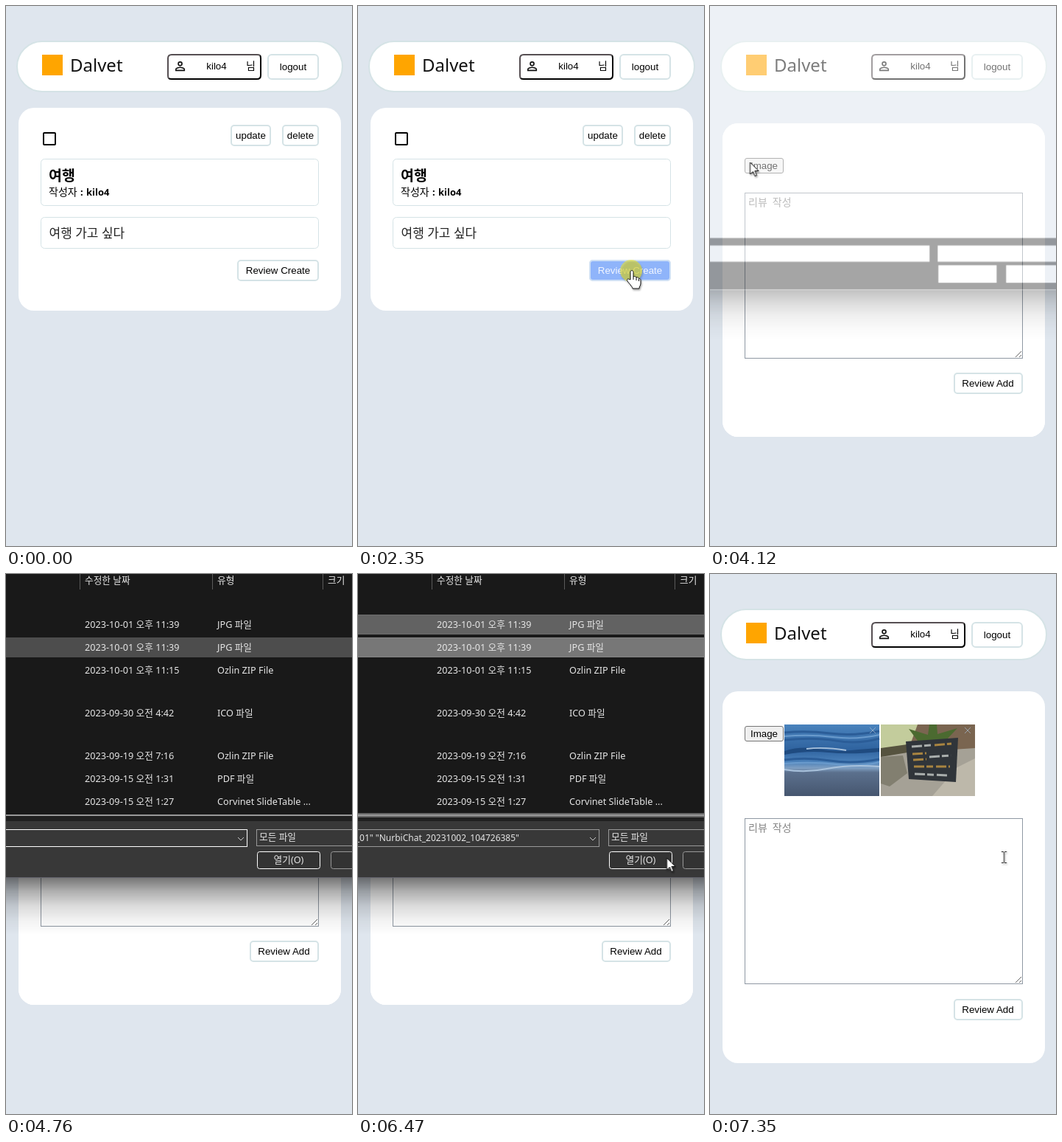
Animation of 470x732 px, one loop 8000 ms. Source, as an HTML page:

```html
<!DOCTYPE html>
<html lang="ko">
<head>
<meta charset="utf-8">
<title>Review with pictures</title>
<style>
html, body { margin: 0; width: 100%; height: 100%; overflow: hidden; background: #dfe6ee; }
svg { display: block; width: 470px; height: 732px; }
text { font: 13.33px 'Liberation Sans', Arial, sans-serif; }
.mid { text-anchor: middle; }
.ko { font-family: 'Noto Sans', 'Noto Sans CJK KR', 'Noto Sans CJK', sans-serif; }
.mono { font: 14px 'Noto Sans Mono CJK KR', 'Noto Sans CJK KR', 'Noto Sans CJK', monospace; fill: #858585; }
.brand { font: 24px 'Noto Sans', 'Open Sans', sans-serif; fill: #111; }
.btn rect { fill: #fff; stroke: #d5e3e6; stroke-width: 2; }
.box { fill: #fff; stroke: #d5e3e6; }
.dialog text { font: 12.7px 'Noto Sans', 'Noto Sans CJK KR', 'Noto Sans CJK', sans-serif; fill: #e6e6e6; }
.dialog .files { font-size: 12px; }
.row { fill: #191919; stroke: #191919; }

/* One percent of the loop is 80 ms. */
.step { animation: 8s step-end infinite; }
.flow { animation: 8s linear infinite; }
.off { opacity: 0; }

.list { animation-name: list; }
.form { animation-name: form; }
.hover { animation-name: hover; }
.photos { animation-name: photos; }
.drop { animation-name: drop; }
@keyframes list { 31% { opacity: 0; } }
@keyframes form { 31% { opacity: 1; } }
@keyframes hover { 0%, 18.5% { opacity: 0; } 21%, 100% { opacity: 1; } }
@keyframes photos { 91.875% { opacity: 1; } }
@keyframes drop { 91.875% { transform: translateY(var(--by)); } }

.dialog { transform-origin: -46px 78px; animation-name: dialog; }
.blank { animation-name: blank; }
.lower { animation-name: lower; }
.upper { animation-name: upper; }
.first { animation-name: first; }
.second { animation-name: second; }
.field { animation-name: field; }
.files { animation-name: files; }
.bar { animation-name: bar; }
@keyframes dialog {
  0%, 49.5% { opacity: 0; transform: scale(.87); }
  51.5% { opacity: .45; transform: scale(.92); }
  54.5%, 85% { opacity: 1; transform: none; }
  89%, 100% { opacity: 0; transform: scale(.9); }
}
@keyframes blank { 53.5% { opacity: 0; } }
@keyframes lower { 57.5% { opacity: 1; } }
@keyframes upper { 59.5% { opacity: 1; } }
@keyframes first {
  65.25% { fill: #4d4d4d; stroke: #4d4d4d; }
  70.125% { fill: #777; stroke: #858585; }
  74.875% { fill: #626262; stroke: #6c6c6c; }
}
@keyframes second {
  59.5%, 74.875% { fill: #4d4d4d; stroke: #4d4d4d; }
  63.375% { fill: #191919; stroke: #191919; }
  75.875% { fill: #777; stroke: #858585; }
  81.875% { fill: #626262; stroke: #6c6c6c; }
}
@keyframes field { 71% { stroke: #999; } }
@keyframes files { 75.875% { opacity: 1; } }
@keyframes bar { 79.875% { opacity: 1; } 82.875% { opacity: 0; } }

.cursor { animation-name: travel; filter: drop-shadow(1px 2px 1px rgba(0,0,0,.35)); }
.spot { animation-name: spot; }
.arrow { animation-name: arrow; }
.hand { animation-name: hand; }
.beam { animation-name: beam; }
@keyframes travel {
  0%, 8.3% { transform: translate(36px, -30px); }
  8.375% { transform: translate(36px, 1px); }
  17.625% { transform: translate(305px, 317px); }
  21%, 36% { transform: translate(371px, 359px); }
  40.5%, 52% { transform: translate(54.5px, 212px); }
  56%, 76.5% { transform: translate(-30px, 100px); }
  80.875%, 85.875% { transform: translate(419.5px, 385px); }
  89.875%, 100% { transform: translate(399.5px, 384px); }
}
@keyframes spot {
  29.375%, 42.5%, 82.875% { opacity: 1; }
  31%, 45.5%, 85.875% { opacity: 0; }
}
@keyframes arrow { 8.375%, 39% { opacity: 1; } 19.5%, 88% { opacity: 0; } }
@keyframes hand { 19.5% { opacity: 1; } 31% { opacity: 0; } }
@keyframes beam { 31%, 88% { opacity: 1; } 39% { opacity: 0; } }
</style>
</head>
<body>
<svg viewBox="0 0 470 732">
  <defs>
    <linearGradient id="shade" x2="0" y2="1">
      <stop offset="0" stop-opacity=".55"/>
      <stop offset=".25" stop-opacity=".31"/>
      <stop offset=".5" stop-opacity=".14"/>
      <stop offset=".75" stop-opacity=".05"/>
      <stop offset="1" stop-opacity="0"/>
    </linearGradient>
    <linearGradient id="sea" x2="0" y2="1">
      <stop offset="0" stop-color="#4a83bd"/>
      <stop offset=".35" stop-color="#2f639f"/>
      <stop offset=".52" stop-color="#4a80b9"/>
      <stop offset=".61" stop-color="#7f9fc2"/>
      <stop offset=".67" stop-color="#5b708d"/>
      <stop offset="1" stop-color="#46566f"/>
    </linearGradient>
  </defs>
  <rect width="470" height="732" fill="#dfe6ee"/>

  <!-- header -->
  <rect x="15" y="48" width="442" height="68" rx="34" fill="#fff" stroke="#d5e3e6" stroke-width="2"/>
  <rect x="49" y="66" width="28" height="28" fill="#ffa500"/>
  <text class="brand" x="87" y="89">Dalvet</text>
  <g fill="none" stroke-width="2">
    <path stroke="#564f52" d="M221 98Q220 97 220 94V71Q220 66 225 66H341Q344 66 345 67"/>
    <path stroke="#000" d="M221 98Q222 99 225 99H341Q346 99 346 94V71Q346 68 345 67"/>
    <g transform="translate(226.7 71.8) scale(.82)" stroke="#111">
      <circle cx="12" cy="8" r="3.05"/>
      <path d="M5 19V17C5 15.4 9.2 14 12 14S19 15.4 19 17V19Z"/>
    </g>
  </g>
  <text class="mid" x="286" y="86">kilo4</text>
  <text class="ko" x="326" y="86" style="font-size:14px">님</text>
  <g class="btn">
    <rect x="356" y="66" width="68" height="33" rx="5"/>
    <text class="mid" x="390" y="87">logout</text>
  </g>

  <!-- wish -->
  <g class="step list">
    <rect x="17" y="138" width="438" height="275" rx="21" fill="#fff"/>
    <rect x="51" y="172" width="16" height="16" rx="1" fill="none" stroke="#000" stroke-width="2"/>
    <g class="btn">
      <rect x="306" y="162" width="53" height="27" rx="4"/>
      <text class="mid" x="332.5" y="180">update</text>
      <rect x="376" y="162" width="48" height="27" rx="4"/>
      <text class="mid" x="400" y="180">delete</text>
      <rect x="315" y="345" width="109" height="27" rx="4"/>
      <text class="mid" x="369.5" y="363">Review Create</text>
    </g>
    <rect class="box" x="47.5" y="207.5" width="377" height="63" rx="5"/>
    <text class="ko" x="58" y="237" style="font-size:19.5px;font-weight:600">여행</text>
    <text class="ko" x="58" y="257" style="font-size:14px;font-weight:500">작성자</text>
    <text class="ko" y="257" style="font-size:13px;font-weight:700"><tspan x="101">:</tspan><tspan x="109">kilo4</tspan></text>
    <rect class="box" x="47.5" y="286.5" width="377" height="42" rx="5"/>
    <text class="ko" x="58.5" y="314" style="font-size:17px;font-weight:300" fill="#222">여행 가고 싶다</text>
    <g class="flow hover">
      <rect x="315" y="345" width="109" height="27" rx="4" fill="#8fb4fa" stroke="#cfe0f5" stroke-width="2"/>
      <text class="mid" x="369.5" y="363" fill="#f2f6ff">Review Create</text>
    </g>
  </g>

  <!-- review form -->
  <g class="step form off">
    <rect x="17" y="159" width="438" height="425" rx="21" fill="#fff"/>
    <g class="step drop" style="--by:79px">
      <rect x="17" y="159" width="438" height="425" rx="21" fill="#fff"/>
      <g class="btn">
        <rect x="332" y="498" width="92" height="27" rx="4"/>
        <text class="mid" x="377.5" y="516">Review Add</text>
      </g>
    </g>
    <rect x="47.5" y="206.5" width="52" height="20" rx="2.5" fill="#efefef" stroke="#767676"/>
    <text class="mid" x="73.5" y="221">Image</text>
    <g class="step drop" style="--by:78px">
      <rect x="47.5" y="253.5" width="377" height="224" fill="#fff" stroke="#8f98a3"/>
      <text class="mono" x="52" y="271">리뷰 작성</text>
      <path d="M415 476L423 468M420 476L423 473" stroke="#666"/>
    </g>
    <g class="step photos off">
      <g transform="translate(101 204)">
        <rect width="129" height="97" fill="url(#sea)"/>
        <g fill="none">
          <path d="M0 11Q30 8 62 12T129 9M0 21Q40 17 70 22T129 19M0 48Q30 44 62 49T129 47" stroke="#2b5d98" stroke-width="3"/>
          <path d="M0 16Q35 13 66 17T129 14M0 53Q38 50 70 54T129 51" stroke="#6a9bcd" stroke-width="2"/>
        </g>
        <path d="M0 36Q22 29 45 33T90 35T129 32V37Q90 41 60 38T0 41Z" fill="#1f4b80"/>
        <path d="M30 33Q55 30 84 35M0 61Q28 66 58 60T129 57" fill="none" stroke="#a9c2dc" stroke-width="2"/>
      </g>
      <g transform="translate(232 204)">
        <rect width="128" height="97" fill="#a5a196"/>
        <path d="M0 0H55L42 28 0 34Z" fill="#c3cc9c"/>
        <path d="M0 32L36 27V38L0 44Z" fill="#56533f"/>
        <path d="M50 0H128V32L36 38Z" fill="#7a6550"/>
        <path d="M0 44L30 42 36 66 12 84 0 80Z" fill="#827f70"/>
        <path d="M70 97L104 58 128 46V97Z" fill="#bdb8aa"/>
        <path d="M38 6L64 14 66 0H76L77 13 104 5 88 22H50Z" fill="#4b6a30"/>
        <path d="M34 23L105 18 102 78 38 74Z" fill="#30353a"/>
        <g fill="none" stroke-width="3" stroke-dasharray="14 3 9 4">
          <path d="M42 30L69 28M66 44L96 42M46 67L92 69" stroke="#a9aeac"/>
          <path d="M73 28L96 26M43 40L62 39M44 48L62 47M45 57L94 57" stroke="#a88440"/>
        </g>
      </g>
      <path d="M217 208l8 8m0-8l-8 8M346 208l8 8m0-8l-8 8" stroke="#a9bdd0" stroke-opacity=".7"/>
    </g>
  </g>

  <!-- file dialog -->
  <g class="flow dialog off">
    <rect x="-300" y="411" width="1100" height="78" fill="url(#shade)"/>
    <rect x="-300" y="-200" width="1100" height="530" fill="#191919"/>
    <rect x="-300" y="326" width="1100" height="9" fill="#202020"/>
    <rect x="-300" y="335" width="1100" height="76" fill="#383838"/>
    <rect x="-300" y="411" width="1100" height="1" fill="#62626c"/>
    <rect class="step bar off" x="-300" y="324" width="1100" height="6" fill="#666"/>
    <rect x="-300" y="326" width="1100" height="2" fill="#999"/>
    <path d="M100.5 0V21M280.5 0V21M430.5 0V21" stroke="#5a5a5a"/>
    <text y="13"><tspan x="107">수정한 날짜</tspan><tspan x="287">유형</tspan><tspan x="437">크기</tspan></text>
    <rect class="row step first" x="-300" y="55.5" width="1100" height="26"/>
    <rect class="row step second" x="-300" y="86.5" width="1100" height="26"/>
    <g class="step upper off">
      <text y="73"><tspan x="107">2023-10-01 오후 11:39</tspan><tspan x="287">JPG 파일</tspan></text>
      <text y="104"><tspan x="107">2023-10-01 오후 11:39</tspan><tspan x="287">JPG 파일</tspan></text>
      <text y="135"><tspan x="107">2023-10-01 오후 11:15</tspan><tspan x="287">Ozlin ZIP File</tspan></text>
    </g>
    <g class="step lower off">
      <text y="193"><tspan x="107">2023-09-30 오전 4:42</tspan><tspan x="287">ICO 파일</tspan></text>
      <text y="251"><tspan x="107">2023-09-19 오전 7:16</tspan><tspan x="287">Ozlin ZIP File</tspan></text>
      <text y="282"><tspan x="107">2023-09-15 오전 1:31</tspan><tspan x="287">PDF 파일</tspan></text>
      <text y="313"><tspan x="107">2023-09-15 오전 1:27</tspan><tspan x="287">Corvinet SlideTable ...</tspan></text>
    </g>
    <rect class="step field" x="-300.5" y="346.5" width="628" height="23" fill="#383838" stroke="#fff"/>
    <path d="M315 357l4 4 4-4" fill="none" stroke="#ccc"/>
    <text class="step files off" x="219" y="362" text-anchor="end">_01" "NurbiChat_20231002_104726385"</text>
    <rect x="340.5" y="346.5" width="200" height="22" fill="#383838" stroke="#999"/>
    <text x="344" y="361">모든 파일</text>
    <rect x="341.5" y="376.5" width="85" height="23" rx="3" fill="#333" stroke="#fff"/>
    <text class="mid" x="384" y="392">열기(O)</text>
    <rect x="441.5" y="376.5" width="85" height="23" rx="3" fill="#333" stroke="#999"/>
    <!-- unpainted window while it opens -->
    <g class="step blank">
      <rect x="-300" y="-200" width="1100" height="535" fill="#fff"/>
      <rect x="-300" y="335" width="1100" height="76" fill="#383838"/>
      <path d="M-300 346H328V370H-300ZM340 346H800V370H340ZM341 375H427V401H341ZM441 375H527V401H441Z" fill="#fff"/>
    </g>
  </g>

  <!-- pointer, its tip at the origin -->
  <g class="flow cursor">
    <circle class="step spot off" r="15" fill="#f2ea18" fill-opacity=".55"/>
    <path class="step arrow off" d="M0 0V16L4 12.5 6.5 18.5 9 17.5 6.5 11.5H11.5Z" fill="#fff" stroke="#111"/>
    <g class="step hand off">
      <path d="M-1 12V1.5C-1-1 3-1 3 1.5V8C5 7 6.5 7.5 7 9 9 8.3 10 9 10.5 10.5 12 10 13 11 13 13V17C13 20 11 21 11 24H2C2 22-1 19-5 14-6.5 11.5-4 10-2.5 11.5Z" fill="#fff" stroke="#111"/>
      <path d="M3 8V12M7 9V13M10.5 10.5V14" stroke="#111"/>
    </g>
    <path class="step beam off" d="M-3.5-7.5H-1L0-6.5 1-7.5H3.5M0-6.5V6.5M-3.5 7.5H-1L0 6.5 1 7.5H3.5" fill="none" stroke="#111"/>
  </g>
</svg>
</body>
</html>
```
